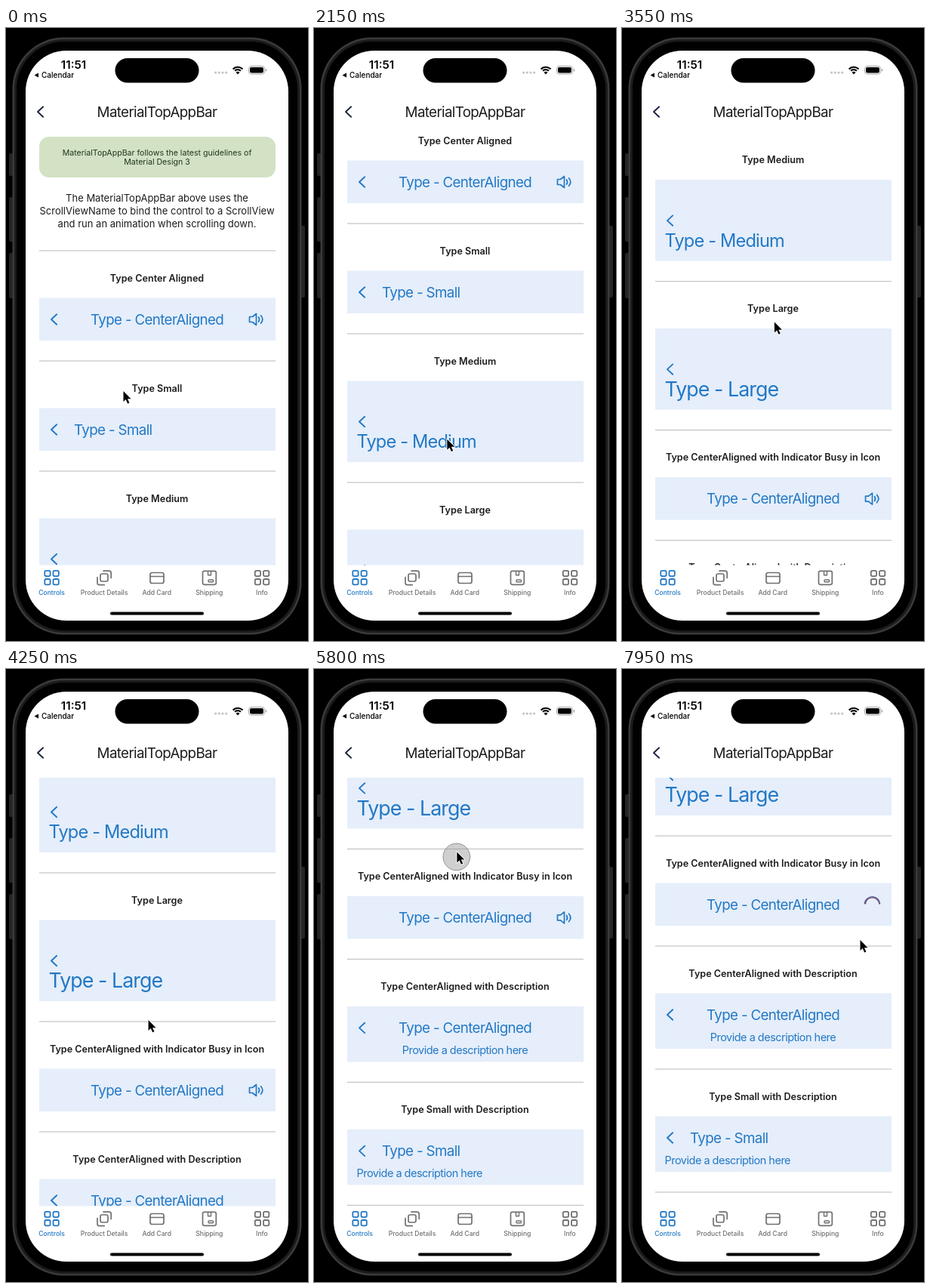
Animation, 400 px wide and 812 px high, one loop 8 s. Source, as an HTML page with a canvas:

```html
<!DOCTYPE html>
<html lang="en">
<head>
<meta charset="utf-8">
<title>Top app bar demo</title>
<style>
html, body { margin: 0; width: 100%; height: 100%; overflow: hidden; background: #000; }
canvas { display: block; width: 400px; height: 812px; }
</style>
</head>
<body>
<canvas id="stage"></canvas>
<script>
const LOOP = 8000, FLING_TIME = 900, BUSY_FROM = 7000;
const BLUE = '#2378c5', BAR = '#e5eefa', INK = '#1c1c1e', GREY = '#707070';

// Finger gestures: content follows the drag, then coasts by `fling`
const GESTURES = [
  { start: 600, end: 1250, from: [100, 463], to: [99, 334], fling: 53 },
  { start: 2500, end: 3350, from: [188, 578], to: [202, 386], fling: 140 },
  { start: 4500, end: 5900, from: [187, 471], to: [189, 225], fling: 0 },
  { start: 6900, end: 7050, from: [330, 312], to: [330, 312], fling: 0 }
];
const REST = { end: 0, to: [155, 481] };
const EXIT = { start: 7950, from: [315, 359] };

const SECTIONS = [
  { caption: 'Type Center Aligned', title: 'Type - CenterAligned', icon: true },
  { caption: 'Type Small', title: 'Type - Small', left: 90 },
  { caption: 'Type Medium', title: 'Type - Medium', left: 56.5, tall: true, size: 23.6 },
  { caption: 'Type Large', title: 'Type - Large', left: 56.5, tall: true, size: 26.8 },
  { caption: 'Type CenterAligned with Indicator Busy in Icon', title: 'Type - CenterAligned', icon: true, busy: true },
  { caption: 'Type CenterAligned with Description', title: 'Type - CenterAligned', described: true },
  { caption: 'Type Small with Description', title: 'Type - Small', left: 90, described: true }
];
const TABS = ['Controls', 'Product Details', 'Add Card', 'Shipping', 'Info'];

const canvas = document.getElementById('stage');
const ctx = canvas.getContext('2d');
const dpr = window.devicePixelRatio || 1;
canvas.width = 400 * dpr;
canvas.height = 812 * dpr;

const progress = (t, from, to) => Math.min(1, Math.max(0, (t - from) / (to - from)));
const easeOut = u => 1 - (1 - u) ** 3;
const easeInOut = u => u * u * u * (u * (6 * u - 15) + 10);
const mix = (a, b, u) => a.map((v, i) => v + (b[i] - v) * u);

function scrollAt(t) {
  return GESTURES.reduce((sum, g) => sum
    + (g.from[1] - g.to[1]) * progress(t, g.start, g.end)
    + g.fling * easeOut(progress(t, g.end, g.end + FLING_TIME)), 0);
}

function pointerAt(t) {
  let last = REST;
  for (const g of [...GESTURES, EXIT]) {
    if (t < g.start) return mix(last.to, g.from, easeInOut(progress(t, last.end, g.start)));
    if (t < g.end) return mix(g.from, g.to, progress(t, g.start, g.end));
    last = g;
  }
  return EXIT.from;
}

function text(str, x, y, size, { color = INK, align = 'center', weight = 400, tracking = 0 } = {}) {
  ctx.font = `${weight} ${size}px Inter, sans-serif`;
  ctx.letterSpacing = `${tracking * size}px`;
  ctx.fillStyle = color;
  ctx.textAlign = align;
  ctx.fillText(str, x, y + size * 0.36);
}

function heading(str, y, size, color, left) {
  text(str, left ?? 200, y, size, { color, align: left ? 'left' : 'center', tracking: -0.035 });
}

function box(x, y, w, h, r, fill) {
  ctx.beginPath();
  ctx.roundRect(x, y, w, h, r);
  if (fill) {
    ctx.fillStyle = fill;
    ctx.fill();
  } else ctx.stroke();
}

function pen(color, width, cap = 'round') {
  ctx.strokeStyle = color;
  ctx.lineWidth = width;
  ctx.lineCap = cap;
  ctx.lineJoin = 'round';
}

function arc(x, y, r, from, to) {
  ctx.beginPath();
  ctx.arc(x, y, r, from * Math.PI, to * Math.PI);
  ctx.stroke();
}

const trace = d => ctx.stroke(new Path2D(d));

function chevron(x, y, color) {
  pen(color, 1.9);
  trace(`M${x + 3.7} ${y - 6.7}l-7.2 6.7l7.2 6.7`);
}

function speaker(y) {
  ctx.save();
  ctx.translate(331, y);
  pen(BLUE, 1.7);
  trace('M-8.5 -3.5h4l5 -4v15l-5 -4h-4z');
  trace('M3.5 -3q2.2 3 0 6M6.5 -5.2q4.6 5.2 0 10.4');
  ctx.restore();
}

function spinner(y, t) {
  const turn = (t - EXIT.start) / 500;
  pen('#3f639f', 1.3, 'butt');
  arc(331.5, y, 10.3, 1.02 + turn, 1.98 + turn);
  pen('#87486a', 1.3, 'butt');
  arc(331.5, y, 9.2, 1.02 + turn, 1.98 + turn);
}

function divider(y) {
  ctx.fillStyle = '#c3c3c6';
  ctx.fillRect(44, y - 0.6, 313, 1.2);
}

// Draws one sample bar and returns where the next section begins
function section(s, y, t) {
  const top = y + 62.5;
  const height = s.tall ? 107.5 : s.described ? 73.5 : 56.5;
  const row = top + (s.tall ? 54 : 28.5);
  divider(y);
  text(s.caption, 200, y + 36, 12.6, { weight: 600 });
  ctx.fillStyle = BAR;
  ctx.fillRect(44, top, 313, height);

  heading(s.title, s.tall ? row + 26 : row, s.size ?? 18.8, BLUE, s.left);
  if (s.described) heading('Provide a description here', row + 29.5, 14.5, BLUE, s.left && 56.5);
  if (!s.busy) chevron(63.5, row, BLUE);
  if (s.busy && t >= BUSY_FROM) spinner(row, t);
  else if (s.icon) speaker(row);
  return top + height + 27;
}

function content(t) {
  box(44, 144, 313, 54, 13, '#d3e2c5');
  const note = { color: '#20361a' };
  text('MaterialTopAppBar follows the latest guidelines of', 200, 165, 10.6, note);
  text('Material Design 3', 200, 177.5, 10.6, note);
  ['The MaterialTopAppBar above uses the',
    'ScrollViewName to bind the control to a ScrollView',
    'and run an animation when scrolling down.'
  ].forEach((line, i) => text(line, 200, 225 + i * 17.3, 13));
  divider(SECTIONS.reduce((y, s) => section(s, y, t), 295));
}

function phone() {
  ctx.fillStyle = '#000';
  ctx.fillRect(0, 0, 400, 812);
  box(4, 166, 6, 30, 2, '#252525');
  box(4, 224, 6, 59, 2, '#252525');
  box(4, 298, 6, 60, 2, '#252525');
  box(390, 262, 6, 95, 2, '#252525');
  box(8.5, 12.5, 383, 791, 68, '#3a3a3b');
  box(11, 15, 378, 786, 66, '#1b1b1c');
  box(14, 18, 372, 780, 63, '#000');
  box(26, 30, 348, 755, 54, '#fff');
}

function statusBar() {
  text('11:51', 89.5, 49, 15.2, { color: '#000', weight: 600 });
  text('Calendar', 47, 62.5, 10, { color: '#000', align: 'left', weight: 500 });
  ctx.fillStyle = '#000';
  ctx.fill(new Path2D('M37.5 62.5l5.5 -3v6z'));
  box(144.5, 40, 111, 32.5, 16.25, '#000');

  for (let i = 0; i < 4; i++) box(276 + i * 4.7, 57.5, 3.2, 3.2, 1.6, '#c4c4c6');
  pen('#000', 2.1, 'butt');
  for (const r of [5.4, 8.8]) arc(307, 60.5, r, -0.76, -0.24);
  ctx.fillStyle = '#000';
  ctx.fill(new Path2D('M307 61.5l-2.5 -2.8q2.5 -2 5 0z'));
  pen('#a4a4a6', 1);
  box(321.5, 50.5, 21, 10.5, 3.2);
  box(323, 52, 18, 7.5, 2, '#000');
  box(343.8, 54, 1.3, 3.6, 0.6, '#a4a4a6');
}

function gridIcon(x, color) {
  pen(color, 1.8);
  for (const dx of [-9.2, 2])
    for (const dy of [-9.2, 2]) box(x + dx, 728 + dy, 7.3, 7.3, 1.8);
}

function tabBar() {
  gridIcon(60.5, BLUE);
  gridIcon(339, GREY);
  pen(GREY, 1.7);
  box(125, 723, 10, 10, 2.2);
  trace('M129 719.2h7.5q2.7 0 2.7 2.7v6.5');
  trace('M121 727.5v7.5q0 2.7 2.7 2.7h6.5');
  box(191, 721.5, 18, 14, 2.5);
  trace('M191 726.5h18');
  box(260.5, 719.3, 17.8, 18, 2.2);
  pen(GREY, 1.4);
  trace('M267.5 719.5v5.2h4v-5.2');
  box(268, 731, 6.5, 2.8, 0.8);
  TABS.forEach((name, i) =>
    text(name, 60.5 + i * 69.6, 748, 8.6, { color: i ? GREY : BLUE, weight: 500 }));
  box(138, 773.4, 124, 4, 2, '#000');
}

function pointer(t) {
  const [x, y] = pointerAt(t);
  if (GESTURES.some(g => t >= g.start && t < g.end)) {
    ctx.beginPath();
    ctx.arc(x, y + 6.5, 17.9, 0, Math.PI * 2);
    ctx.fillStyle = 'rgba(150,150,150,.45)';
    ctx.fill();
    pen('rgba(110,110,110,.75)', 0.9);
    ctx.stroke();
  }
  ctx.save();
  ctx.translate(x, y);
  const arrow = new Path2D('M0.5 0v14l3.2 -3l2.4 5.4l2.3 -1l-2.4 -5.2h4.5z');
  pen('#fff', 2);
  ctx.stroke(arrow);
  ctx.fillStyle = '#000';
  ctx.fill(arrow);
  ctx.restore();
}

function draw(t) {
  ctx.setTransform(dpr, 0, 0, dpr, 0, 0);
  phone();
  ctx.save();
  ctx.beginPath();
  ctx.rect(26, 144, 348, 567.5);
  ctx.clip();
  ctx.translate(0, -scrollAt(t));
  content(t);
  ctx.restore();
  statusBar();
  chevron(45.5, 111, '#1d2540');
  heading('MaterialTopAppBar', 111, 18.8, INK);
  tabBar();
  pointer(t);
}

const start = performance.now();
function tick() {
  draw((performance.now() - start) % LOOP);
  requestAnimationFrame(tick);
}
tick();
</script>
</body>
</html>
```
